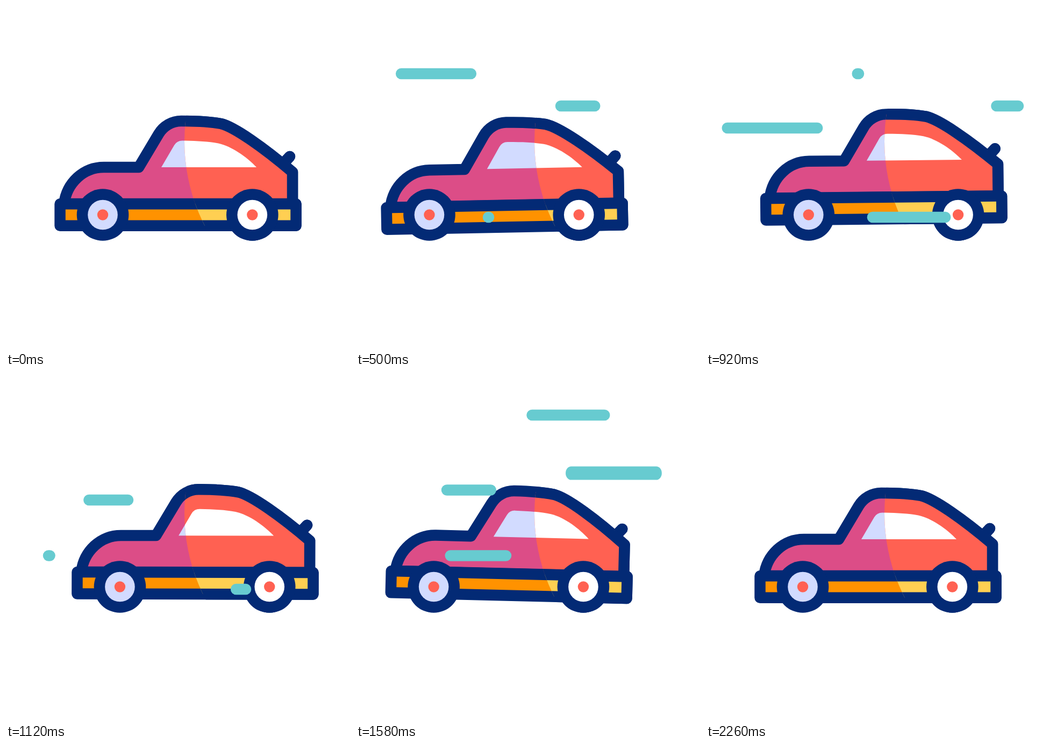
An HTML page with a canvas that plays this animation: 640 px wide and 640 px high, repeating every 2400 ms.

```html
<!DOCTYPE html>
<html lang="en">
<head>
<meta charset="utf-8">
<title>Driving car</title>
<style>
  html, body { margin: 0; width: 100%; height: 100%; overflow: hidden; background: #fff; }
  canvas { display: block; width: 640px; height: 640px; }
</style>
</head>
<body>
<canvas id="stage" width="640" height="640"></canvas>
<script>
const ctx = document.getElementById('stage').getContext('2d');

const LOOP = 2400, STEP = 20, LAST = 2260;
const NAVY = '#032a75', TEAL = '#67cbd0', CORAL = '#ff6152';
const LINE = 20.5;
const LIGHT = { body: CORAL, glass: '#ffffff', strip: '#ffcf52' };
const SHADE = { body: '#dc4d87', glass: '#d2dbff', strip: '#ff9200' };

// Keys are [time, value] pairs, eased in and out between neighbours.
const driveKeys = [[0, 0], [560, -45], [1110, 32], [1635, -37.5], [2160, 0]];
const tiltKeys = [[0, 0], [600, -1.2], [1620, 1.4], [2140, 0]];
const bounceKeys = [[540, 0], [920, -14], [1300, 0], [1500, 0], [1890, -7], [2240, 0]];

// Each streak draws itself along its length, then its tail catches up.
const RUN = 456;
const streaks = [
  { x: 84, y: 126, start: 226 },
  { x: 381, y: 186, start: 329 },
  { x: 246, y: 393, start: 481 },
  { x: 27, y: 227, start: 553, lag: 297 },
  { x: 79, y: 330.5, start: 1090 },
  { x: 263, y: 69, start: 1140 },
  { x: 371, y: 177, start: 1193, lag: 277, tall: 1.23, until: 1870 },
  { x: 169, y: 208.5, start: 1380 }
];

const outline = new Path2D(
  'M108 368 C113 329 144 300 182 300 L247 300 L284 238 ' +
  'C293 223 309 214 326 214 C352 214 380 215.5 400 219 ' +
  'C425 225 480 264 533 309 L533 368 Z');
const spoiler = new Path2D('M528 280 L516 293');
const glass = new Path2D(
  'M289 300 L313 259 Q318 250.5 328 250.5 C355 251 375 252 395 255.5 ' +
  'C420 261 448 281 466 300 Z');
const sill = new Path2D('M100.5 368.3 H539.5 V408.8 H100.5 Z');

const clamp01 = v => Math.min(1, Math.max(0, v));

function ease(v) {
  const u = clamp01(v);
  return u * u * (3 - 2 * u);
}

function valueAt(keys, t) {
  let value = keys[0][1];
  for (let i = 1; i < keys.length; i++) {
    const [t0, v0] = keys[i - 1], [t1, v1] = keys[i];
    if (t >= t0) value = v0 + (v1 - v0) * ease((t - t0) / (t1 - t0));
  }
  return value;
}

function disc(x, y, r, color) {
  ctx.fillStyle = color;
  ctx.beginPath();
  ctx.arc(x, y, r, 0, Math.PI * 2);
  ctx.fill();
}

function shape(path, fill) {
  ctx.fillStyle = fill;
  ctx.fill(path);
  ctx.stroke(path);
}

function drawCar(t, colors) {
  ctx.save();
  ctx.translate(valueAt(driveKeys, t), 0);
  ctx.lineWidth = LINE;
  ctx.lineJoin = ctx.lineCap = 'round';
  ctx.strokeStyle = NAVY;

  // The body pivots on the rear axle; the wheels stay on the ground.
  ctx.save();
  ctx.translate(458, 388.5 + valueAt(bounceKeys, t));
  ctx.rotate(valueAt(tiltKeys, t) * Math.PI / 180);
  ctx.translate(-458, -388.5);
  ctx.stroke(spoiler);
  shape(outline, colors.body);
  ctx.fillStyle = colors.glass;
  ctx.fill(glass);
  shape(sill, colors.strip);
  ctx.restore();

  for (const x of [180, 458.3]) {
    disc(x, 388.5, 48.3, NAVY);
    disc(x, 388.5, 27.8, colors.glass);
    disc(x, 388.5, 10.2, CORAL);
  }
  ctx.restore();
}

function drawStreak(t, { x, y, start, lag = 267, tall = 1, until = LOOP }) {
  const head = ease((t - start) / RUN);
  const tail = ease((t - start - lag) / RUN);
  if (head <= tail || t >= until) return;
  ctx.save();
  ctx.translate(x, y);
  ctx.scale(1, tall);
  ctx.strokeStyle = TEAL;
  ctx.lineWidth = LINE;
  ctx.lineCap = 'round';
  ctx.beginPath();
  ctx.moveTo(200 * tail, 0);
  ctx.lineTo(200 * head, 0);
  ctx.stroke();
  ctx.restore();
}

function draw(t) {
  ctx.fillStyle = '#fff';
  ctx.fillRect(0, 0, 640, 640);
  drawCar(t, SHADE);

  // The lit side is a large circle that stays put while the car moves.
  ctx.save();
  ctx.beginPath();
  ctx.arc(677, 252, 345, 0, Math.PI * 2);
  ctx.clip();
  drawCar(t, LIGHT);
  ctx.restore();

  for (const streak of streaks) drawStreak(t, streak);
}

const begin = performance.now();
function tick() {
  const t = (performance.now() - begin) % LOOP;
  draw(Math.min(LAST, Math.floor(t / STEP) * STEP));
  requestAnimationFrame(tick);
}
tick();
</script>
</body>
</html>
```
